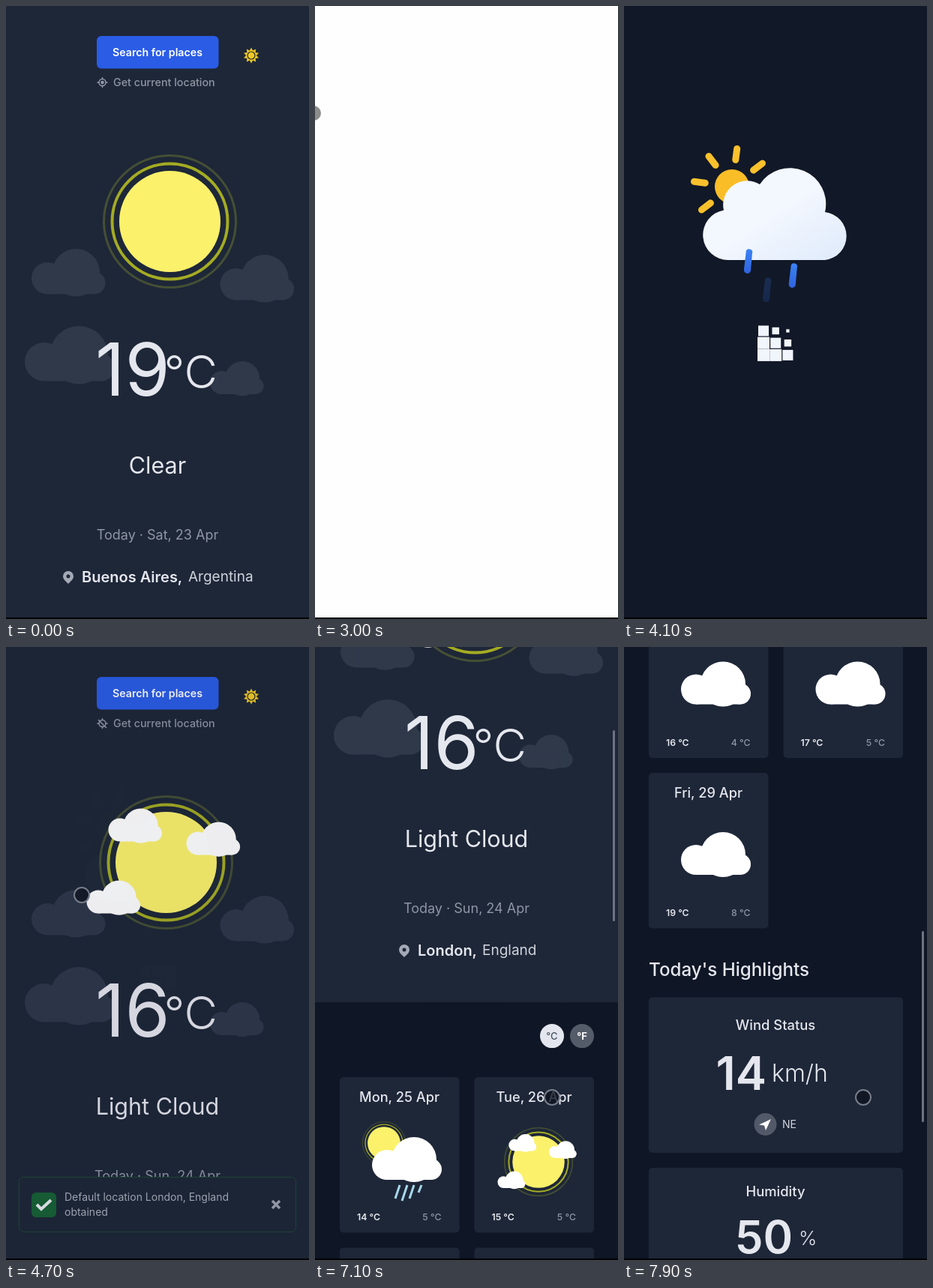
These frames come from a looping animation (404 by 818 pixels, 8 s). An HTML page:

```html
<!DOCTYPE html>
<html lang="en">
<head>
<meta charset="utf-8">
<title>Weather app</title>
<style>
  html, body { margin: 0; width: 100%; height: 100%; overflow: hidden; background: #111827; }
  svg { display: block; width: 404px; height: 818px; font-family: Inter, Roboto, sans-serif; }
</style>
</head>
<body>
<svg viewBox="0 0 404 818">
  <defs>
    <linearGradient id="cloudFill" x1="0" y1="0" x2="1" y2="1">
      <stop offset=".5" stop-color="#f3f7fe"/><stop offset="1" stop-color="#deeafb"/>
    </linearGradient>
    <linearGradient id="drop" x1="0" y1="0" x2="0" y2="1">
      <stop offset="0" stop-color="#3b82f6"/><stop offset="1" stop-color="#2f63dc"/>
    </linearGradient>
    <g id="cloud">
      <circle cx="20" cy="37" r="20"/><circle cx="56" cy="30" r="30"/>
      <circle cx="79" cy="43" r="14"/><path d="M20 30H79V57H20z"/>
    </g>
    <g id="sun" fill="none">
      <circle r="88" stroke="#454f34" stroke-width="3"/>
      <circle r="77" stroke="#a5ac22" stroke-width="4"/>
      <circle r="67.5" fill="#fbf16b"/>
    </g>
    <g id="lightCloud">
      <use href="#sun"/>
      <g fill="#fff">
        <use href="#cloud" transform="translate(-77 -72) scale(.77)"/>
        <use href="#cloud" transform="translate(27 -54) scale(.77)"/>
        <use href="#cloud" transform="translate(-106 24) scale(.77)"/>
      </g>
    </g>
    <g id="showers">
      <use href="#sun" transform="translate(59 88) scale(.325)"/>
      <use href="#cloud" x="43" y="80" fill="#fff"/>
      <path d="M80 144l-6 18M90 144l-7 21M99 144l-6 18M109 144l-4 10" stroke="#a5d8ea" stroke-width="3"/>
    </g>
    <path id="pin" d="M0-8a7 7 0 0 1 7 7c0 4-4 7-7 10c-3-3-7-6-7-10a7 7 0 0 1 7-7zm0 4.5a2.5 2.5 0 1 0 0 5a2.5 2.5 0 1 0 0-5z" fill="#a3aab6" fill-rule="evenodd"/>
    <g id="locate" fill="none" stroke="#959ca9" stroke-width="1.4">
      <circle r="4.5"/><path d="M0-7v3M0 7v-3M-7 0h3M7 0h-3"/>
    </g>
  </defs>

  <g id="loader">
    <g id="rays" stroke="#fac12d" stroke-width="9" stroke-linecap="round"></g>
    <circle cx="144" cy="241" r="23" fill="#f9bd27"/>
    <path fill="url(#cloudFill)" d="M139 339a33.5 33.5 0 0 1-6-66.500a32 32 0 0 1 48-34.500a48 48 0 0 1 87 37a32.200 32.200 0 0 1 0 64z"/>
    <g id="rain"></g>
    <g id="cubes" fill="#f1f5fc"></g>
  </g>
  <g id="app">
    <g id="page"></g>
    <rect id="thumb" x="397" width="3" height="255" rx="1.500" fill="#6d7380"/>
    <g id="toast"></g>
  </g>
  <rect id="blank" width="404" height="818" fill="#fefefe"/>
  <circle id="cursor" r="10" stroke-width="2"/>
  <rect y="816" width="404" height="2" fill="#000"/>
</svg>
<script>
const $ = id => document.getElementById(id);
const LIGHT = '#e5e7ee', GREY = '#8f96a3', PANEL = '#1e2738';

const text = (x, y, size, str, fill = LIGHT, weight = 400, anchor = 'start') =>
  `<text x="${x}" y="${y}" font-size="${size}" font-weight="${weight}" fill="${fill}" text-anchor="${anchor}">${str}</text>`;
const centred = (y, size, str, fill, weight, x = 202) => text(x, y, size, str, fill, weight, 'middle');
const icon = (id, x, y, scale = 1, fill = '#fff') =>
  `<use href="#${id}" transform="translate(${x} ${y}) scale(${scale})" fill="${fill}"/>`;
const panel = (x, y, w) => `<rect x="${x}" y="${y}" width="${w}" height="207.500" rx="5" fill="${PANEL}"/>`;

const city = (id, temp, sky, date, name, country, pinX, countryX) => `<g id="${id}">
  ${text(119, 520, 97, temp)}
  ${centred(624, 30.5, sky)}
  ${centred(712, 18, date, GREY)}
  ${icon('pin', pinX, 762)}
  ${text(pinX + 18, 769, 20, name + ',', LIGHT, 600)}
  ${text(countryX, 768, 19, country, '#d0d4dc')}`;

function today() {
  const star = Array.from({ length: 20 }, (_, i) => {
    const r = i % 2 ? 6.8 : 10.5, a = i * Math.PI / 10;
    return [327 + r * Math.sin(a), 66 - r * Math.cos(a)].map(v => v.toFixed(1));
  }).join(' ');
  const shade = '#2f394a';
  return `<rect width="404" height="831" fill="${PANEL}"/>
    <rect x="121" y="40" width="162.500" height="43.500" rx="6" fill="#2a5ce6"/>
    ${centred(67, 14.2, 'Search for places', '#fff', 600)}
    <polygon points="${star}" fill="#efc924"/>
    <circle cx="327" cy="66" r="5" fill="none" stroke="${PANEL}" stroke-width="1.200"/>
    ${icon('locate', 128.5, 102)}
    ${text(143, 107, 14.3, 'Get current location', GREY, 500)}
    ${icon('cloud', 34, 324, 1.06, shade)}${icon('cloud', 285.5, 332, 1.06, shade)}
    ${icon('cloud', 25, 427, 1.29, shade)}${icon('cloud', 272, 474, .77, shade)}
    ${text(282, 510, 61, '°C', LIGHT, 300, 'end')}
    ${city('before', 19, 'Clear', 'Today · Sat, 23 Apr', 'Buenos Aires', 'Argentina', 83, 243)}
      ${icon('sun', 218.5, 287.5)}<circle cx="128.500" cy="102" r="2.200" fill="#959ca9"/></g>
    ${city('after', 16, 'Light Cloud', 'Today · Sun, 24 Apr', 'London', 'England', 119, 223)}
      ${icon('lightCloud', 213.5, 287.5)}<path d="M123 97l11 11" stroke="#959ca9" stroke-width="1.500"/></g>`;
}

function forecast() {
  const days = [['Mon, 25', 14, 5], ['Tue, 26', 15, 5], ['Wed, 27', 16, 4], ['Thu, 28', 17, 5], ['Fri, 29', 19, 8]];
  const cards = days.map(([day, high, low], i) => {
    const art = i == 0 ? icon('showers', 0, 0)
      : i == 1 ? icon('lightCloud', 85.5, 113, .515) : icon('cloud', 43, 79);
    return `<g transform="translate(${33 + i % 2 * 179.5} ${931 + (i >> 1) * 227.5})">
      ${panel(0, 0, 159.5)}${art}
      ${centred(33, 18.2, day + ' Apr', LIGHT, 500, 79.5)}
      ${text(23, 191, 12.3, high + ' °C', LIGHT, 600)}
      ${text(135.5, 191, 12.3, low + ' °C', GREY, 500, 'end')}</g>`;
  }).join('');
  return `<rect y="831" width="404" height="1800" fill="#0f1726"/>
    <circle cx="316" cy="876" r="16" fill="#e3e6ee"/>${centred(880.5, 13, '°C', '#4b5563', 500, 316)}
    <circle cx="356" cy="876" r="16" fill="#545b69"/>${centred(880.5, 13, '°F', '#fff', 700, 356)}
    ${cards}`;
}

const highlights = () => `<g transform="translate(0 1218)">
  ${text(33, 439, 24.2, "Today's Highlights", LIGHT, 500)}
  ${panel(33, 467.5, 339)}
  ${centred(511, 18.4, 'Wind Status', LIGHT, 500)}
  ${text(190, 591, 62, 14, LIGHT, 600, 'end')}${text(197, 580, 32, 'km/h', LIGHT, 300)}
  <circle cx="188.500" cy="637" r="15" fill="#525968"/>
  <path d="M196 630L180 637.500L187 638.500L189 645z" fill="#fff"/>
  ${text(211, 641.5, 14, 'NE', '#d0d4dc')}
  ${panel(33, 695, 339)}
  ${centred(733, 18.4, 'Humidity', LIGHT, 500)}
  ${text(225, 809, 60, 50, LIGHT, 600, 'end')}${text(233, 798, 26, '%', LIGHT, 300)}</g>`;

$('page').innerHTML = today() + forecast() + highlights();
$('toast').innerHTML = `
  <rect x="17.500" y="707.500" width="369" height="73" rx="6" fill="${PANEL}" stroke="#1d4937"/>
  <rect x="34" y="728" width="33" height="33" rx="6" fill="#176236"/>
  <path d="M41 744l6 6l13-12" fill="none" stroke="#e8ebf0" stroke-width="4"/>
  ${text(78, 739, 14, 'Default location London, England', '#a7aeb9')}${text(78, 759, 14, 'obtained', '#a7aeb9')}
  <path d="M355 739l10 10m0-10l-10 10" stroke="#9ba2ae" stroke-width="3.500"/>`;
$('rays').innerHTML = Array.from({ length: 8 }, (_, i) =>
  `<path d="M36 0H51" transform="rotate(${i * 45})"/>`).join('');
$('rain').innerHTML = '<path d="M-3-15a4.500 4.500 0 0 1 8 4L3 12a4.500 4.500 0 0 1-9-2z" fill="url(#drop)"/>'.repeat(3);
$('cubes').innerHTML = '<rect x="-8" y="-8" width="16" height="16"/>'.repeat(9);

const clamp = v => Math.min(1, Math.max(0, v));
const show = (id, on) => $(id).style.display = on ? '' : 'none';
const smooth = p => p * p * (3 - 2 * p);

// Cursor stops: start time, x, y; it is hidden where x is missing
const stops = [[0], [1200, 28, 186], [2200, -2, 143], [3100], [4600, 101, 331], [5400, 240, 530],
  [5500, 364, 755], [6900, 316, 601], [7800, 319, 601]];

function drawLoader(s) {
  $('rays').setAttribute('transform', `translate(144 241) rotate(${s * 7.5})`);
  [...$('rain').children].forEach((drop, i) => {
    const p = (s / .7 + [.93, .49, .21][i]) % 1;
    drop.setAttribute('transform', `translate(${164.5 + i * 31.5 + 5.7 - 11.4 * p} ${316 + 68 * p})`);
    drop.setAttribute('opacity', clamp(3 * Math.min(p, 1 - p)));
  });
  [...$('cubes').children].forEach((cube, i) => {
    const col = i % 3, row = i / 3 | 0;
    const p = Math.max(0, s - (col + 2 - row) * .1) % 1.3 / 1.3;
    const scale = p < .35 ? 1 - smooth(p / .35) : smooth(clamp((p - .35) / .35));
    cube.setAttribute('transform', `translate(${186 + col * 16.2} ${433.5 + row * 16.2}) scale(${scale})`);
  });
}

function draw(t) {
  const reloaded = t >= 3000, scrolling = t >= 6900;
  const fade = reloaded ? clamp((t - 4450) / 270) : 1;
  show('blank', reloaded && t < 3100);
  show('before', !reloaded);
  show('after', reloaded);
  show('toast', reloaded && t < 6400);
  show('thumb', scrolling);
  $('app').setAttribute('opacity', fade);
  $('loader').setAttribute('opacity', 1 - fade);
  drawLoader(Math.max(0, t - 3090) / 1000);

  const scroll = 1218 * (1 - (1 - clamp((t - 6800) / 1100)) ** 1.089);
  $('page').setAttribute('transform', `translate(0 ${-scroll})`);
  $('thumb').setAttribute('y', scroll / 3.214);

  const [, x, y] = stops.findLast(stop => t >= stop[0]);
  const onWhite = reloaded && t < 3100, cursor = $('cursor');
  show('cursor', x !== undefined);
  cursor.setAttribute('transform', `translate(${x || 0} ${y || 0})`);
  cursor.setAttribute('fill', onWhite ? '#8c8c8c' : 'rgba(15,20,32,.8)');
  cursor.setAttribute('stroke', onWhite ? 'none' : '#777d89');
}

function tick() {
  draw(Math.floor(performance.now() % 8000 / 100) * 100);
  requestAnimationFrame(tick);
}
tick();
</script>
</body>
</html>
```
